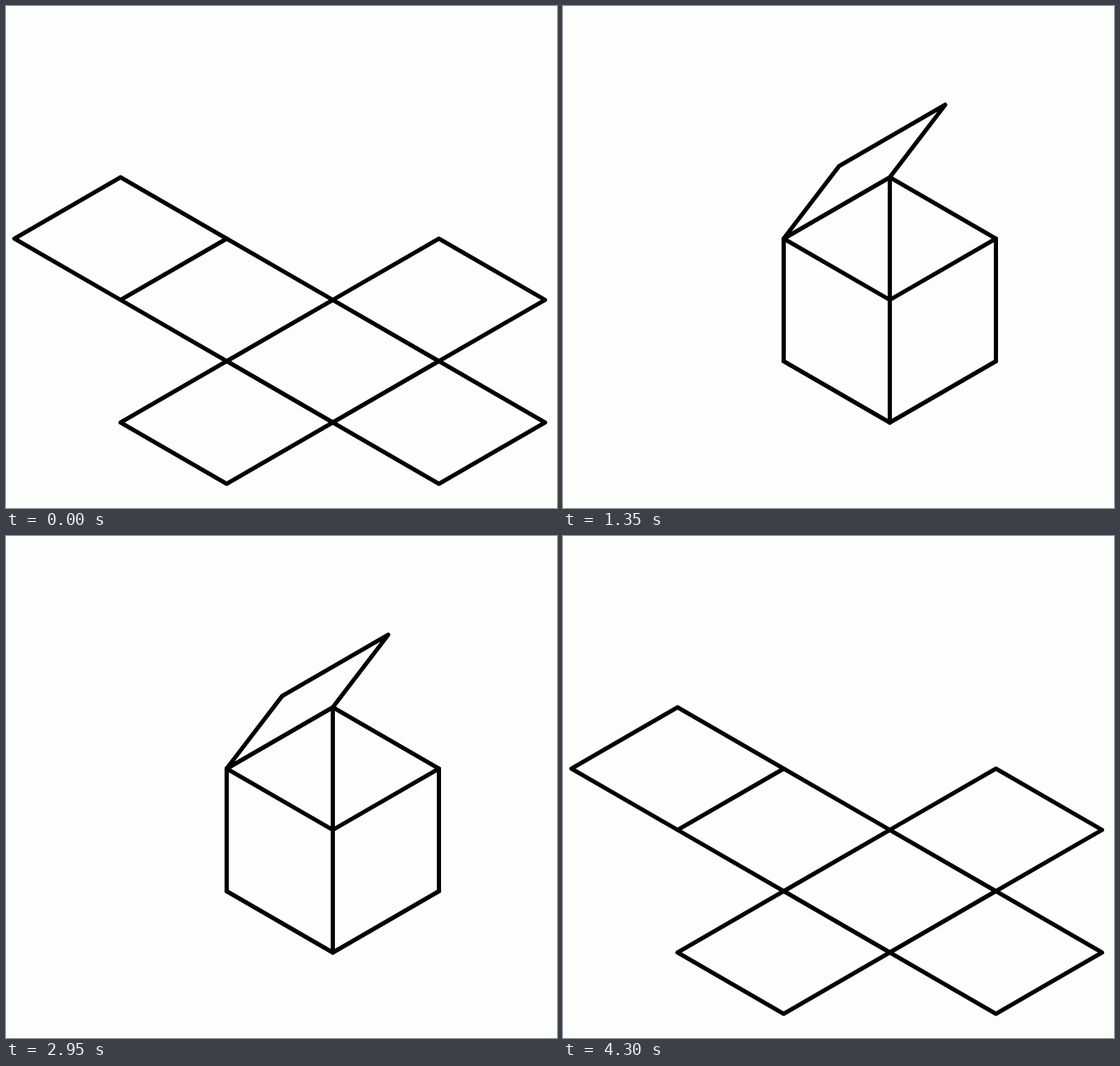
An HTML page with a canvas for the animation above (4600 ms loop, 784 by 714 pixels).

```html
<!DOCTYPE html>
<html>
<head>
<meta charset="utf-8">
<title>Folding box</title>
<style>
html, body { margin: 0; width: 100%; height: 100%; overflow: hidden; background: #fdfffc; }
canvas { display: block; }
</style>
</head>
<body>
<canvas id="stage" width="784" height="714"></canvas>
<script>
const ctx = document.getElementById('stage').getContext('2d');
const LOOP = 4600, STEP = 50, DEGREES_PER_MS = 0.09;

// Isometric unit vectors: toward lower right, lower left and up
const X = [151, 87.2], Y = [-151, 87.2], Z = [0, -174.4];
const BACK = [465, 418];

const add = (a, b) => [a[0] + b[0], a[1] + b[1]];
const neg = a => [-a[0], -a[1]];

// Vector turned by an angle from one axis toward another
const turn = (from, to, angle) =>
  [0, 1].map(i => from[i] * Math.cos(angle) + to[i] * Math.sin(angle));

function face(corner, a, b) {
  ctx.beginPath();
  for (const p of [corner, add(corner, a), add(add(corner, a), b), add(corner, b)]) ctx.lineTo(...p);
  ctx.closePath();
  ctx.fill();
  ctx.stroke();
}

// Total fold: 0 to 90 degrees raises the walls, 90 to 180 closes the lid
function foldAt(t) {
  const ms = t < 2300 ? Math.min(t, 2000) : Math.max(4300 - t, 0);
  return ms * DEGREES_PER_MS * Math.PI / 180;
}

function draw(fold) {
  const wall = Math.min(fold, Math.PI / 2);
  const backLeft = turn(neg(X), Z, wall);
  const lid = turn(neg(X), Z, fold);
  // Past upright the lid leans over along +X
  ctx.clearRect(0, 0, 784, 714);
  face(BACK, X, Y);
  face(BACK, X, turn(neg(Y), Z, wall));
  face(BACK, Y, backLeft);
  face(add(BACK, backLeft), Y, lid);
  face(add(BACK, Y), X, turn(Y, Z, wall));
  face(add(BACK, X), Y, turn(X, Z, wall));
}

ctx.fillStyle = '#fdfffc';
ctx.strokeStyle = '#000';
ctx.lineWidth = 6;
ctx.lineJoin = 'round';

const start = performance.now();
function tick() {
  const t = (performance.now() - start) % LOOP;
  draw(foldAt(Math.floor(t / STEP) * STEP));
  requestAnimationFrame(tick);
}
tick();
</script>
</body>
</html>
```
